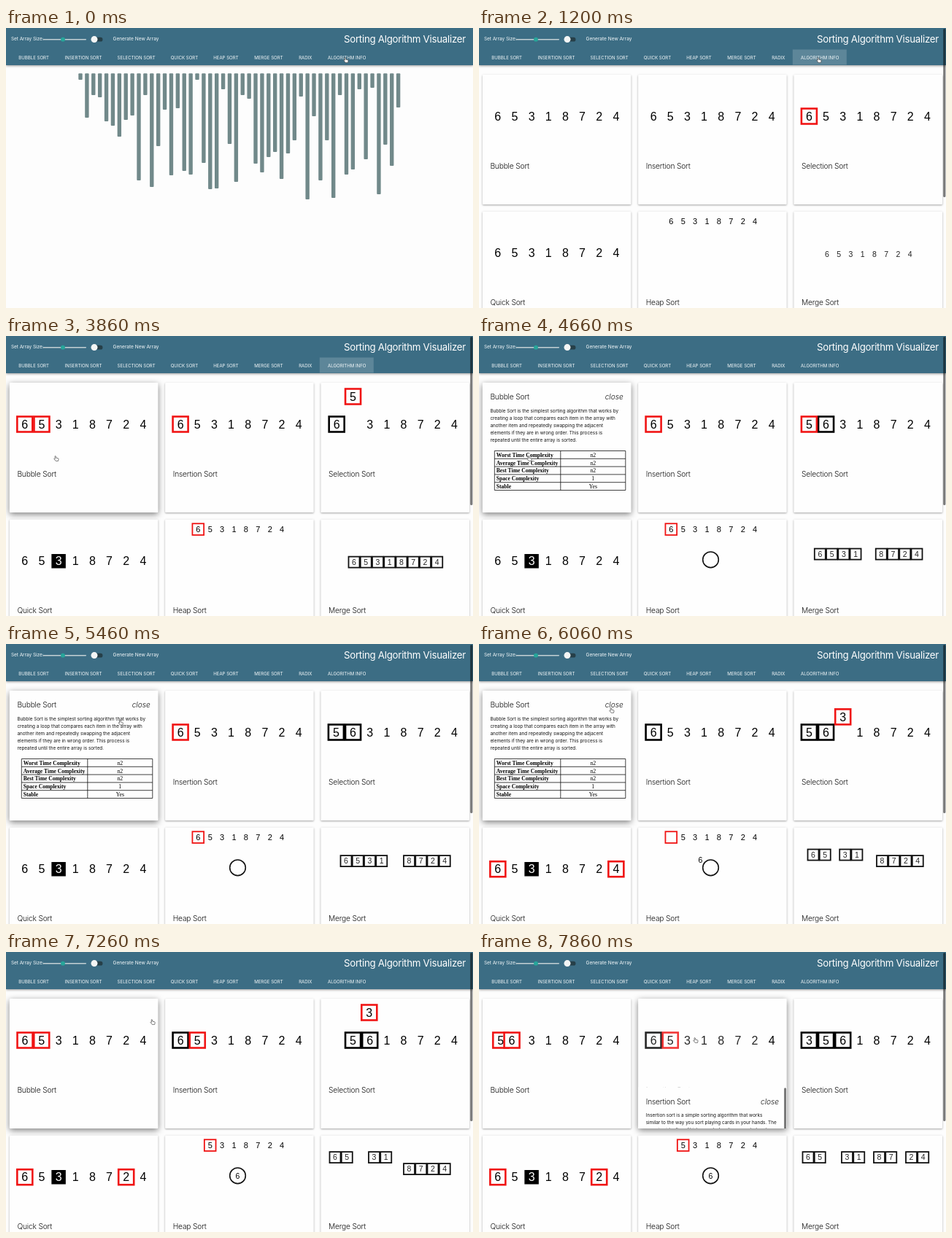
Recreate the animation shown at these times as an HTML page with a canvas. Size 640x384 px, loop 8000 ms.

```html
<!DOCTYPE html>
<html lang="en">
<head>
<meta charset="utf-8">
<title>Sorting Algorithm Visualizer</title>
<style>
  html, body { margin: 0; width: 100%; height: 100%; overflow: hidden; background: #fdfdfd; }
  canvas { display: block; width: 640px; height: 384px; }
</style>
</head>
<body>
<canvas id="stage"></canvas>
<script>
const LOOP = 8000, TICK = 200 / 3;
const RED = '#f01414', BLACK = '#000', PAPER = '#fefefe';
const DIGITS = [6, 5, 3, 1, 8, 7, 2, 4];

// Spans in which the picture moves; it rests between them.
const ACTIVE = [[60, 400], [1200, 1600], [2000, 2060], [2330, 3060], [3200, 3660],
  [3860, 4060], [4200, 4860], [5000, 5130], [5400, 6200], [6260, 6930],
  [7260, 7260], [7530, 7660], [7800, 7860]];

const BAR_ENDS = [71, 123, 92, 95, 128, 134, 149, 126, 120, 209, 92, 218, 162, 112, 202, 110, 196,
  201, 71, 185, 221, 220, 84, 159, 211, 92, 97, 186, 198, 177, 170, 207, 172, 154, 94, 235, 121,
  209, 154, 233, 92, 201, 194, 84, 180, 82, 228, 160, 189, 109];

const TABS = [['BUBBLE SORT', 17.2], ['INSERTION SORT', 80.7], ['SELECTION SORT', 152.6],
  ['QUICK SORT', 225.7], ['HEAP SORT', 284.2], ['MERGE SORT', 340.2], ['RADIX', 401.2], ['ALGORITHM INFO', 441]];

const BUBBLE_INFO = ['Bubble Sort is the simplest sorting algorithm that works by',
  'creating a loop that compares each item in the array with',
  'another item and repeatedly swapping the adjacent',
  'elements if they are in wrong order. This process is',
  'repeated until the entire array is sorted.'];
const INSERTION_INFO = ['Insertion sort is a simple sorting algorithm that works',
  'similar to the way you sort playing cards in your hands. The',
  'array is virtually split into a sorted and an unsorted part.'];
const FACTS = [['Worst Time Complexity', 'n2'], ['Average Time Complexity', 'n2'],
  ['Best Time Complexity', 'n2'], ['Space Complexity', '1'], ['Stable', 'Yes']];

const POINTER = [[0, 466, 44], [1940, 466, 44], [2060, 280, 122], [2330, 126, 185], [2800, 69, 168],
  [5000, 69, 168], [5130, 95, 150], [5600, 182, 91], [7200, 182, 91], [7600, 297, 121]];
const HAND = new Path2D('M-2.4-3.6q1-1.2 1.7.2l.5 2.5 2.8.5q1.1.3 1 1.4l-.6 3h-4l-2.7-3.4q.1-1.2 1.8-.2z');

const canvas = document.getElementById('stage');
const ctx = canvas.getContext('2d');
const ratio = window.devicePixelRatio || 1;
canvas.width = 640 * ratio;
canvas.height = 384 * ratio;

const progress = (t, from, to) => Math.min(1, Math.max(0, (t - from) / (to - from)));
const mix = (a, b, p) => a + (b - a) * p;
const easeInOut = p => p < .5 ? 2 * p * p : 1 - 2 * (1 - p) ** 2;

function track(t, keys) {
  if (t <= keys[0][0]) return keys[0].slice(1);
  for (let i = 1; i < keys.length; i++) {
    const [from, ...a] = keys[i - 1], [to, ...b] = keys[i];
    if (t < to) return a.map((v, k) => mix(v, b[k], progress(t, from, to)));
  }
  return keys[keys.length - 1].slice(1);
}

function settle(t) {
  const ticked = Math.floor((t + 10) / TICK) * TICK;
  let held = 0;
  for (const [from, to] of ACTIVE) if (t >= from) held = Math.min(ticked, to + 7);
  return held;
}

function rect(x, y, w, h, fill, radius = 0) {
  ctx.fillStyle = fill;
  ctx.beginPath();
  ctx.roundRect(x, y, w, h, radius);
  ctx.fill();
}

function disc(x, y, r, fill) {
  ctx.fillStyle = fill;
  ctx.beginPath();
  ctx.arc(x, y, r, 0, 7);
  ctx.fill();
}

function shadowed(color, blur, dy, draw) {
  ctx.save();
  ctx.shadowColor = color;
  ctx.shadowBlur = blur * ratio;
  ctx.shadowOffsetY = dy * ratio;
  draw();
  ctx.restore();
}

function label(text, x, y, font, { color = '#151515', align = 'left', spacing = 0 } = {}) {
  ctx.font = font;
  ctx.fillStyle = color;
  ctx.textAlign = align;
  ctx.letterSpacing = spacing + 'px';
  ctx.fillText(text, x, y);
}

const inter = (size, style = 400) => `${style} ${size}px Inter, sans-serif`;
const arial = size => `${size}px "Liberation Sans", sans-serif`;
const serif = (size, style = 400) => `${style} ${size}px "Liberation Serif", serif`;

function cell(digit, x, y, { box, fill, size = 16, side = 21, line = 2.6, ink = BLACK } = {}) {
  if (fill || box) rect(x - side / 2, y - side / 2, side, side, fill || PAPER);
  if (box) {
    ctx.strokeStyle = box;
    ctx.lineWidth = line;
    ctx.strokeRect(x - side / 2, y - side / 2, side, side);
  }
  label(digit, x, y + size * .36, arial(size), { color: ink, align: 'center' });
}

const slot = i => 21 + 23.15 * i;

// Each picture is drawn relative to the left and top edge of its card.
function bubblePicture(t) {
  const swap = progress(t, 7260, 7990);
  const box = t >= 3400 ? RED : null;
  DIGITS.forEach((d, i) => { if (i > 1) cell(d, slot(i), 57); });
  cell(5, mix(slot(1), slot(0), swap), 57, { box });
  cell(6, mix(slot(0), slot(1), swap), 57, { box });
}

function insertionPicture(t) {
  const boxes = [t < 3400 ? null : t < 5800 ? RED : BLACK, t < 6330 ? null : RED];
  DIGITS.forEach((d, i) => {
    ctx.globalAlpha = t >= 7800 && i < 7 ? .85 : 1;
    cell(d, slot(i), 57, { box: boxes[i] });
  });
  ctx.globalAlpha = 1;
}

function selectionPicture(t) {
  const [a, b, c] = [0, 1, 2].map(slot), low = 57, high = 19;
  const six = track(t, [[3860, a], [4060, b], [6480, b], [6690, c]]);
  const five = track(t, [[3200, b, low], [3660, b, high], [4200, b, high], [4430, a, high],
    [4660, a, low], [6700, a, low], [6930, b, low]]);
  const three = track(t, [[5900, c, low], [6200, c, high], [7260, c, high], [7600, a, high], [7800, a, low]]);
  DIGITS.forEach((d, i) => { if (i > 2) cell(d, slot(i), low); });
  cell(6, six[0], low, { box: t < 2800 ? RED : BLACK });
  cell(5, ...five, { box: t < 3060 ? null : t < 5000 ? RED : BLACK });
  cell(3, ...three, { box: t < 5500 ? null : t < 7800 ? RED : BLACK });
}

function quickPicture(t) {
  const right = t < 7260 ? 7 : 6;
  DIGITS.forEach((d, i) => {
    if (i === 2 && t >= 3400) cell(d, slot(i), 57.2, { fill: BLACK, ink: '#fff', side: 19.5 });
    else cell(d, slot(i), 57.2, { box: t >= 5500 && (i === 0 || i === right) ? RED : null });
  });
}

function heapPicture(t) {
  const style = { size: 11, side: 15.7, line: 1.8 };
  const place = i => 45.2 + 16.4 * i, centre = 99.4;
  const current = t < 7260 ? 0 : 1;
  DIGITS.forEach((d, i) => {
    const box = t >= 3860 && i === current ? RED : null;
    const taken = i === 0 && t >= 5600;
    if (!taken || box) cell(taken ? '' : d, place(i), 13.6, { ...style, box });
  });
  if (t >= 4400) {
    ctx.strokeStyle = '#111';
    ctx.lineWidth = 1.6;
    ctx.beginPath();
    ctx.arc(centre, 55.3, 10.8, 0, 7);
    ctx.stroke();
  }
  if (t >= 5600) {
    const p = progress(t, 5600, 6230);
    cell(6, mix(place(0), centre, p), mix(13.6, 55.6, p), { size: 10.5 });
  }
}

function mergePicture(t) {
  const halves = progress(t, 4200, 4730);
  const leftPairs = progress(t, 5800, 6300), rightPairs = progress(t, 7500, 7700);
  const spread = [-15, 6, -4, 7.5];
  DIGITS.forEach((d, i) => {
    const pair = i >> 1, split = i < 4 ? leftPairs : rightPairs;
    const x = 45.6 + 16.25 * i + (i < 4 ? -11 : 10.5) * halves + spread[pair] * split;
    const y = 58.6 - 12.5 * halves - 16 * split;
    cell(d, x, y, { box: t >= 3400 ? '#111' : null, size: 10.5, side: 15, line: 1.8, ink: '#222' });
  });
}

const CARDS = [
  { title: 'Bubble Sort', picture: bubblePicture, info: BUBBLE_INFO, facts: FACTS,
    hover: t => progress(t, 2330, 2600) - progress(t, 7470, 7700),
    open: t => easeInOut(progress(t, 4190, 4457)) - easeInOut(progress(t, 6260, 6527)) },
  { title: 'Insertion Sort', picture: insertionPicture, info: INSERTION_INFO, scrolls: true,
    hover: t => progress(t, 7470, 7700),
    open: t => easeInOut(progress(t, 7760, 8027)) },
  { title: 'Selection Sort', picture: selectionPicture },
  { title: 'Quick Sort', picture: quickPicture },
  { title: 'Heap Sort', picture: heapPicture },
  { title: 'Merge Sort', picture: mergePicture },
];
const CARD_W = 203.6, CARD_H = 178;
const cardTitle = (text, y) => label(text, 10.6, y, inter(10.2, 300), { spacing: -.17 });

function factTable(facts) {
  const left = 16.5, split = 107, right = 196, top = 93.5, row = 10.8;
  ctx.strokeStyle = '#111';
  ctx.lineWidth = .8;
  ctx.beginPath();
  for (let i = 0; i <= facts.length; i++) {
    ctx.moveTo(left, top + i * row);
    ctx.lineTo(right, top + i * row);
  }
  for (const x of [left, split, right]) {
    ctx.moveTo(x, top);
    ctx.lineTo(x, top + row * facts.length);
  }
  ctx.stroke();
  facts.forEach(([name, value], i) => {
    const y = top + i * row + 8.2;
    label(name, 19, y, serif(7.6, 700), { color: BLACK });
    label(value, (split + right) / 2, y, serif(7.8), { color: BLACK, align: 'center' });
  });
}

function revealPanel({ title, info, facts, scrolls }) {
  rect(0, 0, CARD_W, CARD_H, PAPER);
  cardTitle(title, 23.4);
  label('close', 193, 23.4, inter(10.2, 'italic 300'), { align: 'right' });
  info.forEach((line, i) => label(line, 10.6, 41.3 + i * 9.85, inter(6.38)));
  if (facts) factTable(facts);
  if (scrolls) rect(200, 1, 3, 150, '#777', 1.5);
}

function drawCard(card, i, t) {
  const hover = card.hover ? card.hover(t) : 0, open = card.open ? card.open(t) : 0;
  ctx.save();
  ctx.translate(4.8 + 213.3 * (i % 3), i < 3 ? 64 : 251.5);
  const panel = () => rect(0, 0, CARD_W, CARD_H, PAPER, 1);
  shadowed(`rgba(0,0,0,${mix(.36, .5, hover)})`, mix(2.6, 9, hover), mix(.9, 2.5, hover), panel);
  ctx.beginPath();
  ctx.rect(0, 0, CARD_W, CARD_H);
  ctx.clip();
  card.picture(t);
  cardTitle(card.title, 128.5);
  if (open > 0) {
    ctx.translate(0, CARD_H * (1 - open));
    revealPanel(card);
  }
  ctx.restore();
}

function drawHeader(t) {
  shadowed('rgba(0,0,0,.4)', 3, 1, () => rect(0, 0, 640, 51, '#3c6d84'));
  if (t < 4190) rect(429.8, 29.5, 74, 21, `rgba(255,255,255,${.17 * progress(t, 0, 400)})`);
  const white = { color: '#f6fafb' };
  label('Set Array Size:', 7, 17.4, inter(6.4), white);
  rect(50.5, 14.9, 59.5, 1.5, '#c3d0d4', .7);
  disc(78, 15.7, 2.9, '#26a69a');
  rect(118, 12.8, 14.5, 5.8, '#263f48', 2.9);
  disc(121, 15.6, 4.5, '#f3f5f5');
  label('Generate New Array', 146.5, 17.4, inter(6.55), white);
  label('Sorting Algorithm Visualizer', 630, 19.9, inter(13.3), { color: '#fff', align: 'right', spacing: -.27 });
  for (const [name, x] of TABS) label(name, x, 42.6, inter(6.1), white);
}

function drawPointer(t) {
  ctx.save();
  ctx.translate(...track(t, POINTER));
  ctx.scale(.85, .85);
  ctx.fillStyle = '#fff';
  ctx.fill(HAND);
  ctx.strokeStyle = '#444';
  ctx.lineWidth = .8;
  ctx.stroke(HAND);
  ctx.restore();
}

function draw(t) {
  ctx.setTransform(ratio, 0, 0, ratio, 0, 0);
  rect(0, 0, 640, 384, '#fdfdfd');
  const showCards = t >= 1200;
  if (showCards) CARDS.forEach((card, i) => drawCard(card, i, t));
  else BAR_ENDS.forEach((end, i) => rect(99.3 + 8.89 * i, 62.3, 5.4, end - 62.3, '#71898a', 1));
  drawHeader(t);
  if (showCards) rect(636.2, 1, 3.2, 231, 'rgba(0,0,0,.52)', 1.6);
  drawPointer(t);
}

const start = performance.now();
function frame() {
  draw(settle((performance.now() - start) % LOOP));
  requestAnimationFrame(frame);
}
frame();
</script>
</body>
</html>
```
